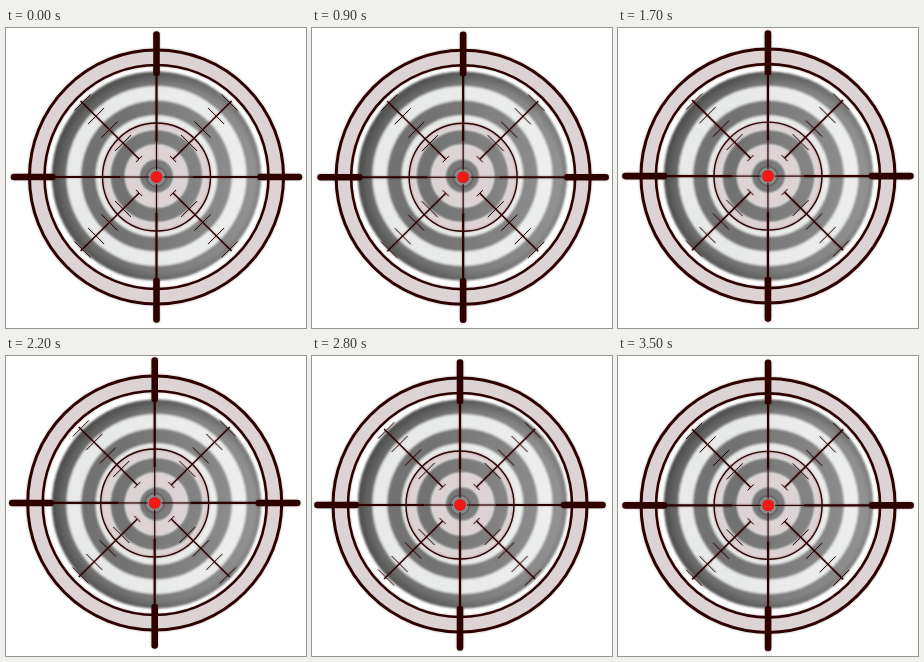
An HTML page for the animation above (3600 ms loop, 300 by 300 pixels).

```html
<!DOCTYPE html>
<html lang="en">
<head>
<meta charset="utf-8">
<title>Swaying crosshair</title>
<style>
html, body { margin: 0; width: 100%; height: 100%; overflow: hidden; background: #fff; }
svg { display: block; width: 300px; height: 300px; }
#tint { mix-blend-mode: darken; }
</style>
</head>
<body>
<svg viewBox="0 0 300 300">
  <defs>
    <radialGradient id="shade" cx="0.52" cy="0.51" r="0.52">
      <stop offset="0.86" stop-color="#000" stop-opacity="0"/>
      <stop offset="1" stop-color="#000" stop-opacity="0.35"/>
    </radialGradient>
    <linearGradient id="gloss">
      <stop offset="0.35" stop-color="#fff" stop-opacity="0"/>
      <stop offset="1" stop-color="#fff" stop-opacity="0.24"/>
    </linearGradient>
    <filter id="soft"><feGaussianBlur stdDeviation="0.9"/></filter>
    <filter id="glow" x="-5%" y="-5%" width="110%" height="110%">
      <feGaussianBlur stdDeviation="0.35" result="line"/>
      <feDropShadow in="line" dx="0" dy="0" stdDeviation="0.8" flood-color="#301818" flood-opacity="0.3"/>
    </filter>
  </defs>
  <g id="target" filter="url(#soft)"></g>
  <circle id="tint" r="54" fill="#ddd2d4"/>
  <g id="sight" filter="url(#glow)" stroke="#2d0404" fill="none"></g>
</svg>
<script>
const NS = 'http://www.w3.org/2000/svg';
const [target, tint, sight] = ['target', 'tint', 'sight'].map(id => document.getElementById(id));

function add(parent, tag, attrs) {
  const el = document.createElementNS(NS, tag);
  for (const key in attrs) el.setAttribute(key, attrs[key]);
  return parent.appendChild(el);
}
const disc = (r, fill) => add(target, 'circle', { cx: 150.5, cy: 148, r, fill });
const ring = (r, width, extra) => add(sight, 'circle', { r, 'stroke-width': width, ...extra });
const line = (parent, x1, y1, x2, y2, width, cap = 'butt') =>
  add(parent, 'line', { x1, y1, x2, y2, 'stroke-width': width, 'stroke-linecap': cap });

// Static target: evenly spaced alternating rings
for (let i = 6; i >= 0; i--) disc(17 + 14.6 * i, i % 2 ? '#e8eae9' : '#717271');
disc(104.6, 'url(#gloss)');
disc(104.6, 'url(#shade)');

// Crosshair, drawn around its own centre
ring(119.5, 14, { stroke: '#ddd2d4' });
ring(127, 3);
ring(112, 2.6);
ring(54, 1.4);
ring(7.6, 3.2, { stroke: '#898989' });
ring(9.5, 1, { stroke: '#5a5a5a' });

for (const [dx, dy] of [[1, 0], [-1, 0], [0, 1], [0, -1]]) {
  const arm = (from, to, ...style) => line(sight, dx * from, dy * from, dx * to, dy * to, ...style);
  arm(104, 142.5, 6.6, 'round');
  arm(36, 102, 2.2);
  arm(7, 36, 1.2);
}

const diagonals = add(sight, 'g', { transform: 'translate(-0.4 -1)' });
for (const sx of [-1, 1]) for (const sy of [-1, 1]) {
  const tick = (d, half) =>
    line(diagonals, sx * (d - half), sy * (d + half), sx * (d + half), sy * (d - half), 1);
  line(diagonals, sx * 17, sy * 17, sx * 75.5, sy * 75, 1.5);
  tick(17, 3);
  for (let d = 33; d < 75; d += 13.5) tick(d, 8);
}
ring(5.8, 0, { fill: '#f51616' });

// Centre of the crosshair at even intervals
const path = [
  [150.5, 149], [149.4, 147.1], [151, 148.9], [151.6, 150.2], [150.2, 148.4],
  [149.2, 147.2], [148.2, 146.7], [148, 149], [148.8, 150.5]
];
const LOOP = 3600, STEP = 100, SPAN = LOOP / path.length;

function draw(time) {
  const pos = Math.floor((time % LOOP) / STEP) * STEP / SPAN;
  const i = Math.floor(pos);
  const a = path[i], b = path[(i + 1) % path.length];
  const [x, y] = a.map((v, n) => v + (b[n] - v) * (pos - i));
  sight.setAttribute('transform', `translate(${x} ${y})`);
  tint.setAttribute('cx', x);
  tint.setAttribute('cy', y);
}

const start = performance.now();
function frame() {
  draw(performance.now() - start);
  requestAnimationFrame(frame);
}
frame();
</script>
</body>
</html>
```
